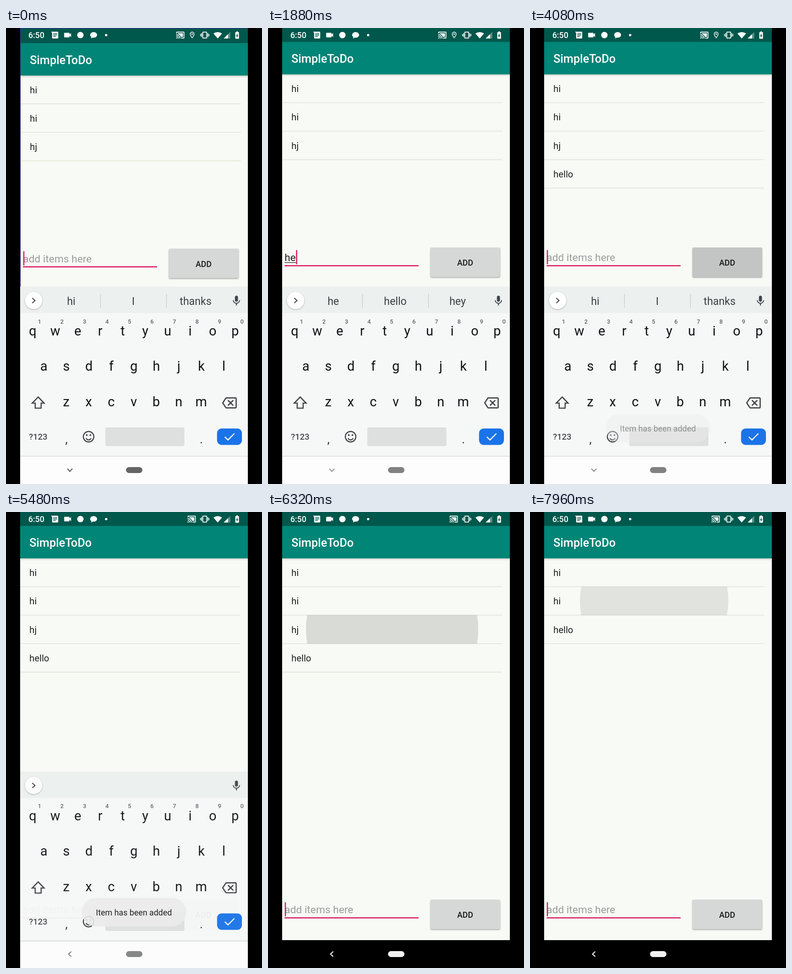
These frames come from a looping animation (561x998 px, 8000 ms). An HTML page with a canvas:

```html
<!DOCTYPE html>
<html lang="en">
<head>
<meta charset="utf-8">
<title>To-do list</title>
<style>
  html, body { margin: 0; width: 100%; height: 100%; overflow: hidden; background: #000; }
  canvas { display: block; }
</style>
</head>
<body>
<canvas id="stage" width="561" height="998"></canvas>
<script>
const ctx = document.getElementById('stage').getContext('2d');
const LOOP = 8000, LEFT = 31, RIGHT = 530, ROW = 62.4, BOTTOM = 937;
const ACCENT = '#d9185c', INK = '#1f2020', KEY = '#43474b';
const ADDED = 3860, REMOVED = 6640, IME_OUT = 5400;

// Text in the field from each moment on
const typing = [[0, ''], [1560, 'h'], [1820, 'he'], [2600, 'hel'], [2840, 'hell'], [3280, 'hello'], [ADDED, '']];
const hints = {
  '': ['hi', 'I', 'thanks'], h: ['h', 'hi', 'hey'], he: ['he', 'hello', 'hey'],
  hel: ['hel', 'hello', 'help'], hell: ['hell', 'hello', 'hells'], hello: ['hello', 'hellos', 'hey'],
};

// Icons on a 24-unit grid
const icons = {
  video: 'M17 10.5V7c0-.55-.45-1-1-1H4c-.55 0-1 .45-1 1v10c0 .55.45 1 1 1h12c.55 0 1-.45 1-1v-3.5l4 4v-11l-4 4z',
  message: 'M1 2h19c1.1 0 2 .9 2 2v16c0 1-1 2-2 2H6c-1 0-2-1-2-2V6zM7 7v2h12V7zm0 4v2h12v-2zm0 4v2h8v-2z',
  chat: 'M12 3C6 3 1.5 6.8 1.5 11.5c0 2.7 1.5 5 3.8 6.5L4 22.5l6-3 2 .2c6 0 10.5-3.6 10.5-8.2S18 3 12 3z',
  cast: 'M21 3H3c-1.1 0-2 .9-2 2v3h2V5h18v14h-7v2h7c1.1 0 2-.9 2-2V5c0-1.1-.9-2-2-2zM1 18v3h3c0-1.66-1.34-3-3-3zm0-4v2c2.76 0 5 2.24 5 5h2c0-3.87-3.13-7-7-7zm0-4v2c4.97 0 9 4.03 9 9h2c0-6.08-4.93-11-11-11zM19 7H5v1.63c3.96 1.28 7.09 4.41 8.37 8.37H19V7z',
  place: 'M12 2C8.13 2 5 5.13 5 9c0 5.25 7 13 7 13s7-7.75 7-13c0-3.87-3.13-7-7-7zM7 9c0-2.76 2.24-5 5-5s5 2.24 5 5c0 2.88-2.88 7.19-5 9.88C9.92 16.21 7 11.85 7 9zM12 11.2a2.2 2.2 0 1 1 0-4.4a2.2 2.2 0 1 1 0 4.4z',
  vibrate: 'M0 15h2V9H0v6zm3 2h2V7H3v10zm19-8v6h2V9h-2zm-3 8h2V7h-2v10zM16.5 3h-9C6.67 3 6 3.67 6 4.5v15c0 .83.67 1.5 1.5 1.5h9c.83 0 1.5-.67 1.5-1.5v-15c0-.83-.67-1.5-1.5-1.5zM16 19H8V5h8v14z',
  battery: 'M15.67 4H14V2h-4v2H8.33C7.6 4 7 4.6 7 5.33v15.33C7 21.4 7.6 22 8.33 22h7.33c.74 0 1.34-.6 1.34-1.33V5.33C17 4.6 16.4 4 15.67 4zM11 20v-5.5H9L13 7v5.5h2L11 20z',
  mic: 'M12 14c1.66 0 2.99-1.34 2.99-3L15 5c0-1.66-1.34-3-3-3S9 3.34 9 5v6c0 1.66 1.34 3 3 3zm5.3-3c0 3-2.54 5.1-5.3 5.1S6.7 14 6.7 11H5c0 3.41 2.72 6.23 6 6.72V21h2v-3.28c3.28-.48 6-3.3 6-6.72h-1.7z',
  erase: 'M22 3H7c-.69 0-1.23.35-1.59.88L0 12l5.41 8.11c.36.53.9.89 1.59.89h15c1.1 0 2-.9 2-2V5c0-1.1-.9-2-2-2zm0 16H7.07L2.4 12l4.66-7H22v14zm-11.59-2L14 13.41 17.59 17 19 15.59 15.41 12 19 8.41 17.59 7 14 10.59 10.41 7 9 8.41 12.59 12 9 15.59z',
};
for (const name in icons) icons[name] = new Path2D(icons[name]);

const clamp = v => Math.max(0, Math.min(1, v));

function rect(x, y, w, h, color, r = 0) {
  ctx.fillStyle = color;
  ctx.beginPath();
  ctx.roundRect(x, y, w, h, r);
  ctx.fill();
}

function disc(x, y, r, color) {
  ctx.fillStyle = color;
  ctx.beginPath();
  ctx.arc(x, y, r, 0, 7);
  ctx.fill();
}

function text(str, x, y, size, color = INK, align = 'left', weight = 400) {
  ctx.font = `${weight} ${size}px Roboto, sans-serif`;
  ctx.textAlign = align;
  ctx.fillStyle = color;
  ctx.fillText(str, x, y);
}

function icon(name, x, y, scale, color) {
  ctx.save();
  ctx.translate(x, y);
  ctx.scale(scale, scale);
  ctx.translate(-12, -12);
  ctx.fillStyle = color;
  ctx.fill(icons[name], 'evenodd');
  ctx.restore();
}

function path(d, color, width) {
  const p = new Path2D(d);
  if (width) {
    ctx.strokeStyle = color;
    ctx.lineWidth = width;
    ctx.stroke(p);
  } else {
    ctx.fillStyle = color;
    ctx.fill(p);
  }
}

function shadow(blur, dy, alpha, draw) {
  ctx.save();
  ctx.shadowColor = `rgba(0,0,0,${alpha})`;
  ctx.shadowBlur = blur;
  ctx.shadowOffsetY = dy;
  draw();
  ctx.restore();
}

function ripple(x, y, w, h, cx, radius, alpha) {
  if (alpha <= 0) return;
  ctx.save();
  ctx.beginPath();
  ctx.rect(x, y, w, h);
  ctx.clip();
  disc(cx, y + h / 2, radius, `rgba(0,0,0,${alpha})`);
  ctx.restore();
}

function statusBar(t) {
  const white = '#fff';
  text('6:50', 49, 22, 17.75, white, 'left', 500);
  icon('message', 107, 15.5, .74, white);
  icon('video', 135, 15.5, .84, white);
  disc(163, 15.5, 7, white);
  icon('chat', 192, 15.5, .72, white);
  disc(219.5, 15.5, 2.6, white);
  const located = t < 5160;
  icon('cast', located ? 382 : 407, 15.5, .82, white);
  if (located) icon('place', 408, 15.5, .72, white);
  icon('vibrate', 435.5, 15.5, .83, white);
  path('M454.5 12Q464 6 473.5 12L464 23z', white);
  path('M477 23L491.5 8.5V23z', 'rgba(255,255,255,.35)');
  path('M477 23L486.5 13.5V23z', white);
  icon('battery', 506.5, 15.5, .8, white);
}

function list(t) {
  const items = ['hi', 'hi', 'hj'];
  if (t >= ADDED + 100) items.push('hello');
  if (t >= REMOVED) items.splice(2, 1);
  const top = i => 101 + i * ROW;

  items.forEach((_, i) => rect(LEFT, top(i + 1) - 1, 482.5, 1.8, '#e4e7dc'));
  const press = (row, start, fade) =>
    ripple(LEFT, top(row), 482.5, ROW, 272, 145 + 98 * clamp((t - start) / 450), .125 * fade);
  press(2, 6120, clamp((t - 6120) / 110) * (1 - clamp((t - 6850) / 230)));
  press(1, 7880, .75 * clamp((t - 7880) / 80));
  items.forEach((s, i) => text(s, 51.3, top(i) + 39, 20.28, INK));
}

function entry(t) {
  ctx.save();
  if (t >= IME_OUT) ctx.translate(0, 368);
  const [since, value] = typing.findLast(step => step[0] <= t);
  text(value || 'add items here', 36.3, 510, 22.8, value ? INK : '#9b9d9b');
  const width = value ? ctx.measureText(value).width : 0;
  if (value) rect(36.3, 512.8, width, 1.3, INK);
  rect(36.3, 519, 293.7, 2.5, ACCENT);
  if ((t - since) % 1000 < 500) rect(36.8 + width, 486, 2.5, 31, ACCENT);

  shadow(3, 1.5, .35, () => rect(356, 480.5, 152.5, 64.5, '#d6d7d7', 2.5));
  ripple(356, 480.5, 152.5, 64.5, 432, 30 + 70 * clamp((t - 3760) / 200),
    .09 * clamp((t - 3760) / 75) * (1 - clamp((t - 4120) / 300)));
  text('ADD', 432, 520, 17.75, '#161717', 'center', 500);
  ctx.restore();
}

// The window slides its last few pixels into place over a purple backdrop
function app(t) {
  const settle = t < 40 ? 1 : (1 - clamp((t - 40) / 160)) ** 2;
  const dy = 2.6 * settle;
  rect(LEFT, 0, RIGHT - LEFT, BOTTOM, '#4527a0');
  ctx.save();
  ctx.translate(settle, dy);
  rect(LEFT, 0, RIGHT - LEFT, BOTTOM, '#f8faf6');
  list(t);
  entry(t);
  shadow(4, 1.5, .22, () => rect(LEFT, 30, RIGHT - LEFT, 71.4, '#008577'));
  text('SimpleToDo', 51.3, 76, 25.35, '#fff', 'left', 500);
  rect(LEFT, settle - dy, RIGHT - LEFT, 30.4 - settle + dy, '#00574b');
  ctx.restore();
  statusBar(t);
}

function navButtons(color, pill, turn) {
  ctx.save();
  ctx.translate(140, 967.5);
  ctx.rotate(turn * Math.PI / 2);
  path('M-5.5 -3L0 3L5.5 -3', color, 2);
  ctx.restore();
  rect(263, 961, 36, 13, pill, 6.5);
}

function keyboard(t) {
  const p = clamp((t - IME_OUT) / 150);
  if (p === 1) return;
  const value = typing.findLast(step => step[0] <= t)[1];
  ctx.save();
  ctx.globalAlpha = 1 - p ** 5;
  ctx.save();
  ctx.translate(0, 43 * p ** 5);
  rect(LEFT, 566, RIGHT - LEFT, 432, '#f6f8f7');
  rect(LEFT, 566, RIGHT - LEFT, 58, '#ecf0ee');

  shadow(3, 1, .3, () => disc(60.5, 596.5, 19, '#fff'));
  path('M57.5 591L63.5 596.5L57.5 602', KEY, 2.2);
  icon('mic', 505, 597, 1.13, KEY);
  if (t < IME_OUT) {
    hints[value].forEach((s, i) => text(s, [143, 279, 415.5][i], 606, 23.3, '#3c4043', 'center'));
    for (const x of [207, 351.5]) rect(x - .5, 582, 1.2, 30, '#c4c8c9');
  }

  const row = (keys, x, y) => [...keys].forEach((k, i) => text(k, x + 49.3 * i, y, 29, '#101214', 'center'));
  row('qwertyuiop', 58.5, 673);
  row('asdfghjkl', 83, 750);
  row('zxcvbnm', 132, 828);
  [...'1234567890'].forEach((d, i) => text(d, 73.5 + 49.3 * i, 646.5, 13, '#5f6368', 'center', 500));

  path('M70.5 807.5L83.5 821H77V832H64V821H57.5z', KEY, 2.6);
  icon('erase', 489.5, 820.5, 1.35, KEY);
  text('?123', 70.5, 901, 18.5, KEY, 'center', 500);
  text(',', 132.5, 909, 25, '#202124', 'center');
  text('.', 428, 909, 25, '#202124', 'center');
  ctx.strokeStyle = KEY;
  ctx.lineWidth = 2.4;
  ctx.beginPath();
  ctx.arc(181, 894.5, 11.5, 0, 7);
  ctx.stroke();
  ctx.beginPath();
  ctx.arc(181, 895.5, 6, .35, Math.PI - .35);
  ctx.stroke();
  disc(177, 891, 1.9, KEY);
  disc(185, 891, 1.9, KEY);
  rect(217.5, 874, 173.5, 41, '#dedfdf', 4);
  rect(462.5, 876.5, 54.5, 36, '#1a73e8', 10);
  path('M479.5 895L486.5 901.5L500.5 887.5', '#fff', 2.4);

  rect(LEFT, BOTTOM, RIGHT - LEFT, 61, '#fcfdfc');
  rect(LEFT, BOTTOM - .5, RIGHT - LEFT, 1.5, '#d9dbdf');
  ctx.restore();
  const gray = (from, to) => `rgb(0 0 0 / ${from + (to - from) * clamp(t / 800)})`;
  navButtons(t < IME_OUT ? gray(.65, .43) : '#777', gray(.6, .49), clamp((t - IME_OUT) / 60));
  ctx.restore();
}

function toast(t) {
  const alpha = clamp((t - 4000) / 180) * (1 - clamp((t - 6000) / 200));
  if (!alpha) return;
  ctx.save();
  ctx.globalAlpha = alpha;
  rect(166, 844.5, 229, 62.5, 'rgba(234,235,234,.9)', 31);
  text('Item has been added', 280.3, 882.5, 17.9, '#202121', 'center');
  ctx.restore();
}

function draw() {
  const t = performance.now() % LOOP;
  ctx.fillStyle = '#000';
  ctx.fillRect(0, 0, 561, 998);
  ctx.save();
  ctx.beginPath();
  ctx.rect(LEFT, 0, RIGHT - LEFT, 998);
  ctx.clip();
  app(t);
  rect(LEFT, BOTTOM, RIGHT - LEFT, 61, '#000');
  navButtons('#fff', '#f1f3f1', 1);
  keyboard(t);
  toast(t);
  ctx.restore();
  requestAnimationFrame(draw);
}
draw();
</script>
</body>
</html>
```
